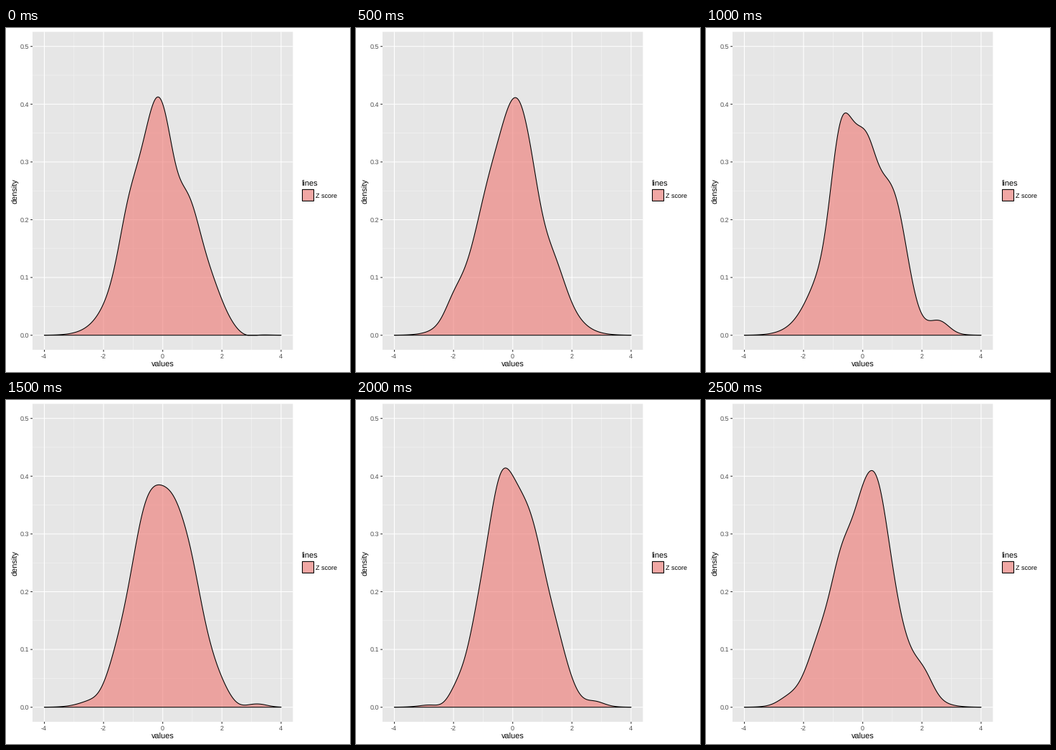
Animation, 480 px wide and 480 px high, one loop 3 s. Source, as a matplotlib script:

```python
import numpy as np
import matplotlib.pyplot as plt
from matplotlib.animation import FuncAnimation
from matplotlib.patches import Polygon, Rectangle

plt.rcParams["text.hinting"] = "none"
plt.rcParams["text.hinting_factor"] = 1

SIZE, DPI = 480, 72
X0, UNIT_X = 218.7, 41.29      # pixel of value 0, pixels per unit
Y0, UNIT_Y = 428.7, 806        # pixel of density 0, pixels per unit
LEFT, RIGHT, TOP, BOTTOM = 37, 400.3, 5.4, 449
SALMON = (239 / 255, 117 / 255, 112 / 255, 0.6)
BUMP_WIDTH = 0.3

# Each sample departs from the standard normal curve by a few
# bumps and dips: (centre, height in thousandths)
SAMPLES = [
    [(-1.2, 36), (-0.2, 26), (0.48, -70), (1.8, 10), (2.75, -7)],
    [(-2, 22), (-0.5, -17), (0.2, 18), (1, -32), (1.6, 7)],
    [(-1.3, -20), (-0.79, 78), (-0.15, -34), (0.5, -50), (1.2, 34),
     (1.95, -20), (2.65, 14)],
    [(-2.1, -12), (-0.7, 22), (0.05, -17), (1, 19), (2.5, -9), (3.25, 4)],
    [(-2.3, -16), (-1.6, -20), (-0.45, 40), (0.2, -14), (0.8, 11),
     (1.5, 15), (2.3, -9), (2.8, 5)],
    [(-2.6, 6), (-1.65, 9), (-1.1, -14), (-0.35, -46), (0.53, 44),
     (1.35, -12), (2.1, 23)],
]


def px(value):
    return X0 + UNIT_X * value


def py(density):
    return Y0 - UNIT_Y * density


def bell(x, centre=0, width=1):
    return np.exp(-((x - centre) / width) ** 2 / 2)


def outline(bumps):
    x = np.linspace(-4, 4, 512)
    density = bell(x) / np.sqrt(2 * np.pi)
    for centre, height in bumps:
        density += height / 1000 * bell(x, centre, BUMP_WIDTH)
    curve = np.column_stack([px(x), py(np.maximum(density, 0))])
    return np.vstack([curve, [[px(4), Y0], [px(-4), Y0]]])


fig = plt.figure(figsize=(SIZE / DPI, SIZE / DPI), dpi=DPI, facecolor="white")
ax = fig.add_axes([0, 0, 1, 1])
ax.set(xlim=(0, SIZE), ylim=(SIZE, 0))
ax.axis("off")


def line(xs, ys, color, width, z=1):
    ax.plot(xs, ys, color=color, lw=width, zorder=z, snap=False,
            solid_capstyle="butt")


def label(x, y, text, size, color="black", **kw):
    ax.text(x, y, text, fontsize=size, color=color, family="Liberation Sans",
            va="baseline", **kw)


def box(x, y, w, h, **kw):
    ax.add_patch(Rectangle((x, y), w, h, snap=False, **kw))


box(LEFT, TOP, RIGHT - LEFT, BOTTOM - TOP, fc="#e6e6e6", ec="none", zorder=0)

for v in range(-3, 4, 2):
    line([px(v)] * 2, [TOP, BOTTOM], "#f3f3f3", 0.7)
for k in range(5):
    line([LEFT, RIGHT], [py(0.05 + k / 10)] * 2, "#f3f3f3", 0.7)
for v in range(-4, 5, 2):
    line([px(v)] * 2, [TOP, BOTTOM], "white", 1.07, 2)
    line([px(v)] * 2, [BOTTOM, BOTTOM + 2.8], "#333333", 1.07)
    label(px(v) - 0.5, 460.9, str(v), 9, "#4d4d4d", ha="center")
for k in range(6):
    y = py(k / 10)
    line([LEFT, RIGHT], [y] * 2, "white", 1.07, 2)
    line([LEFT - 2.8, LEFT], [y] * 2, "#333333", 1.07)
    label(32, y + 3.2, f"{k / 10:.1f}", 9, "#4d4d4d", ha="right")

label(X0, 473, "values", 11, ha="center")
label(16.5, 227.3, "density", 11, ha="center", rotation=90,
      rotation_mode="anchor")

# Legend
label(412.7, 221, "lines", 11)
box(413, 224.9, 17.2, 17.2, fc="#f2f2f2", ec="none", zorder=3)
box(413.5, 225.4, 16, 16, fc=SALMON, ec="black", lw=1.07, zorder=4)
label(432.3, 236.8, "Z score", 9)

shapes = [outline(bumps) for bumps in SAMPLES]
density = Polygon(shapes[0], closed=True, fc=SALMON, ec="black", lw=1.07,
                  joinstyle="round", zorder=5)
ax.add_patch(density)


def update(i):
    density.set_xy(shapes[i % len(shapes)])
    return [density]


anim = FuncAnimation(fig, update, frames=len(shapes), interval=500,
                     repeat=True, repeat_delay=0, blit=False)
plt.show()
```
